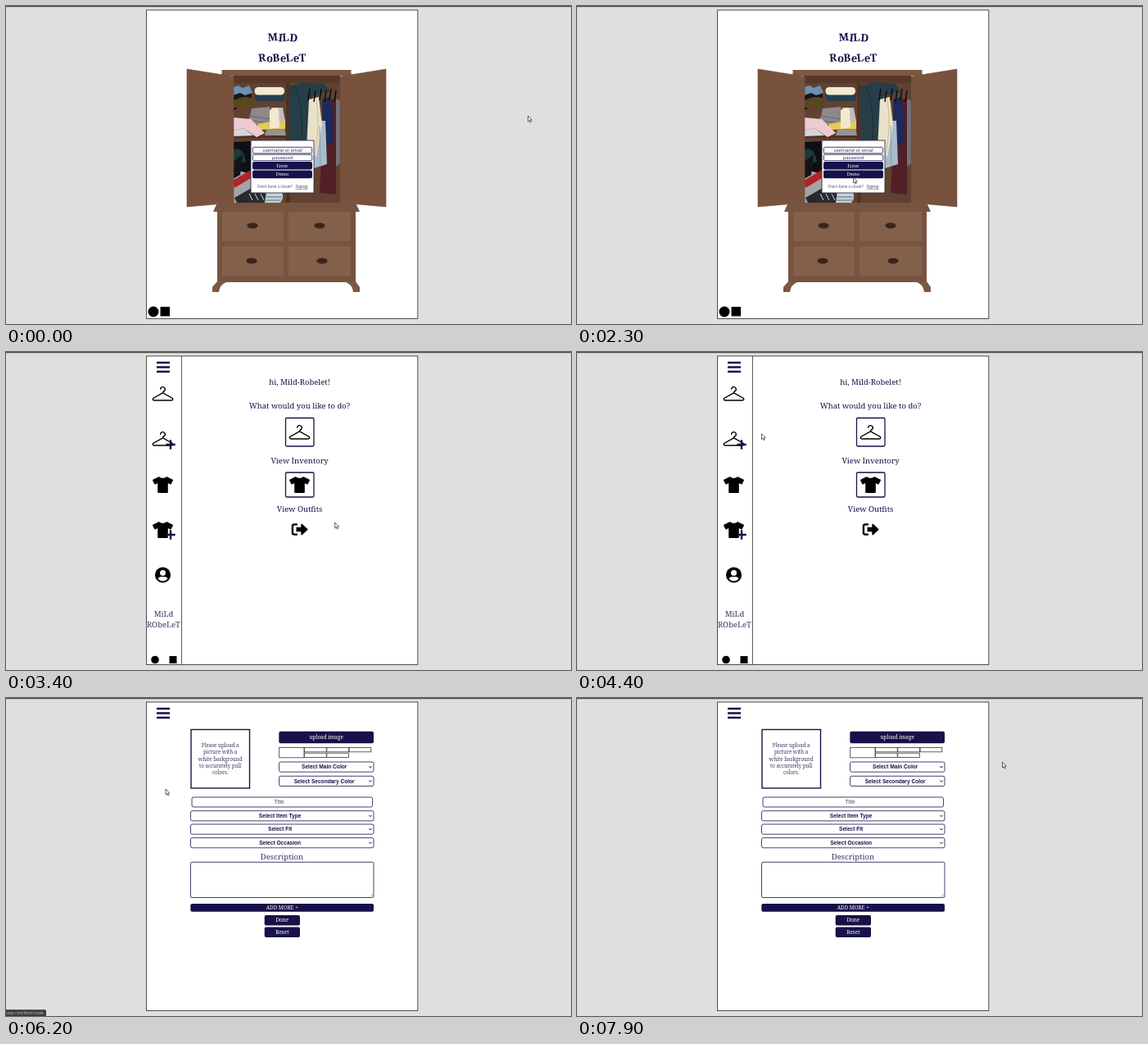
These frames come from a looping animation (690 by 388 pixels, 8 s). An HTML page:

```html
<!DOCTYPE html>
<html lang="en">
<head>
<meta charset="utf-8">
<title>Wardrobe app</title>
<style>
html, body { margin: 0; width: 100%; height: 100%; overflow: hidden; background: #dfdfdf; }
svg { display: block; width: 100%; height: 100%; }
text { font-family: "Noto Serif", serif; text-anchor: middle; }
.sans { font-family: "Liberation Sans", Arial, sans-serif; }
</style>
</head>
<body>
<svg id="stage" viewBox="0 0 690 388"></svg>
<script>
const NAVY = '#17124a', INK = '#3a3560', WOOD = '#7d5843', EDGE = '#6f4b39';
const LOOP = 8000, STEP = 100;

const rect = (x, y, w, h, fill, more = '') =>
  `<rect x="${x}" y="${y}" width="${w}" height="${h}" fill="${fill}" ${more}/>`;
const path = (d, fill, more = '') => `<path d="${d}" fill="${fill}" ${more}/>`;
const line = (d, color, width, more = '') =>
  path(d, 'none', `stroke="${color}" stroke-width="${width}" ${more}`);
const dot = (x, y, r, fill, ry = r) =>
  `<ellipse cx="${x}" cy="${y}" rx="${r}" ry="${ry}" fill="${fill}"/>`;
const text = (x, y, size, str, fill = NAVY, more = '') =>
  `<text x="${x}" y="${y + size * 0.35}" font-size="${size}" fill="${fill}" ${more}>${str}</text>`;
const at = (x, y, body) => `<g transform="translate(${x} ${y})">${body}</g>`;
const group = (id, body) => `<g id="${id}">${body}</g>`;
const frame = (x, y, w, h, width = 0.8, rx = 2) =>
  rect(x, y, w, h, '#fff', `rx="${rx}" stroke="${NAVY}" stroke-width="${width}"`);
const button = (x, y, w, h, size, label) =>
  rect(x, y, w, h, NAVY, 'rx="2"') + text(x + w / 2, y + h / 2, size, label, '#fff');

// Icons, centred on the origin
const hanger = line('M-2.8-5.8A2.8 2.8 0 1 1 1-3Q0-2.6 0-1.2L11.8 5.4Q13 7.9 10.6 8H-10.6Q-13 7.9-11.8 5.4L0-1.2',
  '#000', 1.4, 'stroke-linecap="round"');
const shirt = path('M-4.6-10C-3-7.6 3-7.6 4.6-10L12.2-6.2Q12.7-5.8 12.4-5.2L10.1-.8Q9.7-.3 9.1-.6L6.3-2V9Q6.3 10 5.2 10' +
  'H-5.2Q-6.3 10-6.3 9V-2L-9.1-.6Q-9.7-.3-10.1-.8L-12.4-5.2Q-12.7-5.8-12.2-6.2Z', '#000');
const plus = line('M-5.7 0H5.7M0-5.7V5.7', NAVY, 2.4);
const person = dot(0, 0, 9.6, '#000') + dot(0, -2.4, 3.5, '#fff') +
  path('M-6 4.8Q-5.4 2.2-2.6 2.2H2.6Q5.4 2.2 6 4.8Q3.4 7.6 0 7.6T-6 4.8Z', '#fff');
const logout = line('M-2.6-6.1H-6.4Q-8.6-6.1-8.6-4V4Q-8.6 6.1-6.4 6.1H-2.6', '#000', 2.4) +
  path('M-4-2.8H1.8V-6Q2.2-7.4 3.4-6.6L9.8-.6Q10.3 0 9.8.6L3.4 6.6Q2.2 7.4 1.8 6V2.8H-4Z', '#000');
const menu = line('M184 13H200M184 18.5H200M184 24H200', NAVY, 2.3);

function wardrobe() {
  const drawer = (x, y, w) => rect(x, y, w, 36, '#83604a');
  const knob = (x, y) => dot(x, y, 6.6, '#3a251c', 3.4);
  return rect(277, 85, 131, 155, '#61412f') + rect(342, 85, 4.5, 155, '#4c3225') +
    rect(277, 85, 131, 9, '#553828') + rect(277, 158, 65, 3, '#4c3225') +
    clothes() +
    rect(263.5, 78, 158, 7, WOOD) +
    path('M221 77L278 86V240L221 245Z', '#79523e', `stroke="${EDGE}" stroke-width=".6"`) +
    path('M464 77L408 86V240L464 245Z', '#79523e', `stroke="${EDGE}" stroke-width=".6"`) +
    path('M258 240H427L432 251H253Z', '#775340') +
    rect(258, 251, 169, 86, '#775340') +
    drawer(264, 251, 75) + drawer(345, 251, 76) + drawer(264, 293, 75) + drawer(345, 293, 76) +
    knob(301, 268) + knob(383, 268) + knob(300, 311) + knob(386, 311) +
    path('M258 336H427L432 343V349H424Q423 340 415 337H269Q261 340 260 349H252V343Z', WOOD);
}

function clothes() {
  const pegs = [371, 378, 385, 391, 397, 403]
    .map((x, i) => `M${x} ${101 + i % 2 * 2}l-2 14`).join('');
  return path('M277 106L300 104V113L277 128Z', '#171719') +
    path('M277 99L284 97 289 100 297 97 301 106 292 109 286 106 277 109Z', '#6c91b0') +
    path('M277 116Q290 108 302 113L301 124H277Z', '#574820') +
    rect(304, 106, 37, 10, '#24404f', 'rx="4"') + rect(303.5, 99, 36.5, 9.5, '#f2ead0', 'rx="4.5"') +
    path('M300 125L322 123 324 146 294 143 298 134Z', '#8d898b') +
    path('M296 134L322 138M298 140L322 143', 'none', 'stroke="#5f5b60" stroke-width=".8"') +
    path('M307 144L341 138V150L308 151Z', '#e3cd55') +
    path('M324 124H338L341 141 322 143Z', '#c0bcbb') +
    path('M322 127Q330 122 333 126L334 148 322 150Z', '#f1e9cf') +
    path('M318 151L340 150 342 158H316Z', '#99918f') +
    path('M277 136L299 138 316 155 306 160 290 149 277 152Z', '#eecbd0') +
    path('M277 152L290 149 302 158 277 159Z', '#d8d6da') +
    path('M277 166L299 165V203L288 224 277 233Z', '#0e0f12') +
    path('M277 176Q289 169 293 190L277 194Z', '#183b3d') +
    path('M277 199L299 205V240H277Z', '#a4a3a6') +
    path('M277 213L299 200V210L279 222Z', '#b32228') +
    path('M277 190L289 181 286 206 277 211Z', '#151416') +
    path('M279 234L300 222 318 230V240H282Z', '#27292c') +
    line('M297 229l4 8M304 229l4 8M311 229l4 8', '#d9dadc', 1) +
    path('M318 227H337Q340 235 335 240H316Z', '#c4d3d8') + line('M318 233H337M317 237H336', '#5a7078', 1) +
    // Hanging rail
    path('M346 98L362 93 388 95 396 104 374 110 369 164H347Z', '#263e48') +
    line('M352 98Q363 116 361 163', '#1a2d35', 1) +
    path('M402 113L410 116 411 190 403 196Z', '#77737a') +
    path('M391 114L403 113V230L383 228 386 165Z', '#501f27') +
    path('M386 114L395 111 400 130 399 168 387 170Z', '#1e2a5b') +
    path('M376 140H390L392 193 376 198Z', '#a9bccb') +
    path('M370 114L382 111 386 145 379 184 367 175Z', '#eae2c8') +
    line('M379 115Q384 142 377 182', '#bdb49b', 0.8) + line('M383 146L384 194', '#7e94a8', 0.8) +
    line(pegs, '#0d0b0c', 1.5);
}

function modal(failed) {
  const top = failed ? 155 : 164, shift = failed ? 8.7 : 0;
  const field = (y, label) => frame(301.3, y, 72.4, 7.5, 0.8, 1.5) +
    text(337.5, y + 3.6, 5.8, label, '#333a55', 'class="sans" font-style="italic"');
  return rect(299, top, 77, failed ? 82 : 64, '#fff', 'stroke="#33304a" stroke-width=".9"') +
    (failed ? text(337.5, 166.3, 4.6, 'Sorry, invalid credentials.', '#e2496a') +
      text(337.5, 172.3, 4.6, 'Try again', '#e2496a') : '') +
    at(0, shift, field(172.3, 'username or email') + field(181.2, 'password') +
      button(301, 190, 73, 9.5, 5.5, 'Enter') + button(301, 200.5, 73, 9.7, 5.5, 'Demo') +
      text(328.5, 220.5, 4.6, "Don't have a closet?", '#555') +
      text(361, 220.5, 4.6, 'Signup', '#444', 'text-decoration="underline"'));
}

function login() {
  const title = 'font-weight="800" rotate="-5 6 -4 5 -6 4 -3"';
  return text(338, 38.5, 13, 'MILD', NAVY, title) + text(337.5, 63.5, 13, 'RoBeLeT', NAVY, title) +
    wardrobe() + group('ask', modal(false)) + group('fail', modal(true)) +
    dot(180, 373, 6.5, '#000') + rect(188.5, 367, 11.5, 11.5, '#000');
}

function home() {
  const label = (y, str) => text(358.5, y, 9.5, str, NAVY, 'font-weight="500"');
  return menu + line('M214.5 5V381', '#333', 0.8) +
    at(191.5, 51, hanger) + at(191.5, 106, hanger) + at(201, 113, plus) +
    at(191.5, 162, shirt) + at(191.5, 217, shirt) + at(201, 223, plus) + at(191.5, 272, person) +
    text(192.5, 320, 9.5, 'MiLd', INK) + text(192.5, 332.5, 9.5, 'RObeLeT', INK) +
    dot(182, 375.5, 4.8, '#000') + rect(199.5, 371, 9, 9, '#000') +
    label(36.5, 'hi, Mild-Robelet!') + label(66, 'What would you like to do?') +
    frame(341.5, 80.5, 34.5, 34.5, 1.3, 1.5) + at(358.5, 98, hanger) + label(132.5, 'View Inventory') +
    frame(341.5, 147, 34.5, 30, 1.3, 1.5) + at(358.5, 162, shirt) + label(192, 'View Outfits') +
    at(358.5, 216.5, logout);
}

function form() {
  const select = (x, y, label) => frame(x, y, 449 - x, 12.2) +
    text((x + 449) / 2 - 2.6, y + 6.1, 6.6, label, NAVY, 'class="sans" font-weight="bold"') +
    line(`M443.4 ${y + 5.3}l1.6 1.7l1.6-1.7`, NAVY, 1);
  const swatch = (x, y, w, h) => rect(x, y, w, h, '#fff', 'stroke="#3a3a3a" stroke-width=".8"');
  const hint = ['Please upload a', 'picture with a', 'white background', 'to accurately pull', 'colors.'];
  return menu + frame(226, 38.5, 71.5, 71.5, 1.4, 0) +
    hint.map((s, i) => text(261.7, 58 + i * 8.2, 6.2, s, INK)).join('') +
    button(333.3, 40.7, 115.7, 14.6, 6.4, 'upload image') +
    swatch(333.7, 60.5, 30.3, 12.3) +
    [0, 1, 2].map(i => swatch(364.5 + i * 27.3, 60.5, 26.7, 5.3)).join('') +
    [0, 1].map(i => swatch(364.5 + i * 27.3, 67.2, 26.7, 5.3)).join('') +
    select(333.5, 78, 'Select Main Color') + select(333.5, 95.3, 'Select Secondary Color') +
    frame(227, 121, 220.5, 12) + text(333.7, 127, 6.6, 'Title', '#555', 'class="sans"') +
    select(225.5, 137.7, 'Select Item Type') + select(225.5, 154, 'Select Fit') +
    select(225.5, 170.6, 'Select Occasion') +
    text(337, 193.7, 9.5, 'Description', INK) + frame(225.5, 200.3, 223.5, 43.2, 0.8, 1.5) +
    line('M444.5 242.5l3.5-3.5M446.5 242.5l1.5-1.5', '#777', 0.5) +
    button(225.3, 251, 223.7, 9.8, 6.3, 'ADD MORE +') +
    button(315.7, 265, 43.3, 12.4, 6.4, 'Done') + button(315.7, 279.5, 43.3, 12.4, 6.4, 'Reset');
}

const status = (w, str) => rect(-2, 380.3, w + 2, 10, '#3b3b3d', 'rx="1.5"') +
  text(w - 3, 384.2, 4.9, str, '#b5b5b5', 'class="sans" style="text-anchor:end"');

const stage = document.getElementById('stage');
stage.innerHTML = rect(0, 0, 690, 388, '#dfdfdf') + rect(0, 0, 690, 1.2, '#4a4a4a') +
  rect(171.5, 5, 331.3, 376.5, '#fff', 'stroke="#3c3c3c" stroke-width=".9"') +
  group('login', login()) + group('home', home()) + group('form', form()) +
  group('items', status(36, 'uapp.com/items')) + group('create', status(49, 'uapp.com/item/create')) +
  group('cursor',
    group('arrow', path('M0 0V7L1.6 5.6 2.7 8 3.8 7.5 2.7 5.2H4.8Z', '#fff', 'stroke="#222" stroke-width=".7"')) +
    group('hand', path('M0 0Q1.2-.6 1.4.6V3L4.6 3.8Q5.4 4.2 5 6L4.4 8.6H.4L-2 5.4Q-1.6 4.2 0 5Z',
      '#fff', 'stroke="#222" stroke-width=".7"')));

// Pointer stops: time, x, y
const STOPS = [
  [0, 637.5, 134], [500, 352, 72], [700, 352, 72], [1000, 345, 97], [1500, 345, 97],
  [2300, 337.5, 209], [2400, 337.5, 209], [2500, 338.5, 207], [2700, 338.5, 207],
  [3300, 376, 207], [3400, 401.7, 208], [3700, 401.7, 208], [4600, 200, 84],
  [5100, 179, 86.5], [5600, 195, 111], [6200, 195, 111], [7000, 306, 235],
  [7700, 524, 64], [7900, 519.5, 78], [LOOP, 519.5, 78]
];

function pointer(t) {
  const i = STOPS.findIndex(s => s[0] > t);
  const [t0, x0, y0] = STOPS[i - 1], [t1, x1, y1] = STOPS[i];
  const k = (t - t0) / (t1 - t0), e = k * k * (3 - 2 * k);
  return [x0 + (x1 - x0) * e, y0 + (y1 - y0) * e];
}

const parts = {};
stage.querySelectorAll('g[id]').forEach(g => parts[g.id] = g);
const show = (id, on) => parts[id].setAttribute('display', on ? 'inline' : 'none');

function draw(ms) {
  const t = Math.floor(ms % LOOP / STEP) * STEP;
  const during = (id, from, to) => show(id, t >= from && t < to);
  during('login', 0, 3400);
  during('ask', 0, 3000);
  during('fail', 3000, 3400);
  during('home', 3400, 6200);
  during('form', 6200, LOOP);
  during('items', 4800, 5300);
  during('create', 5300, 6400);
  const hand = t >= 2500 && t < 2900;
  show('hand', hand);
  show('arrow', !hand);
  parts.cursor.setAttribute('transform', `translate(${pointer(t)})`);
}

const start = performance.now();
function tick() {
  draw(performance.now() - start);
  requestAnimationFrame(tick);
}
tick();
</script>
</body>
</html>
```
